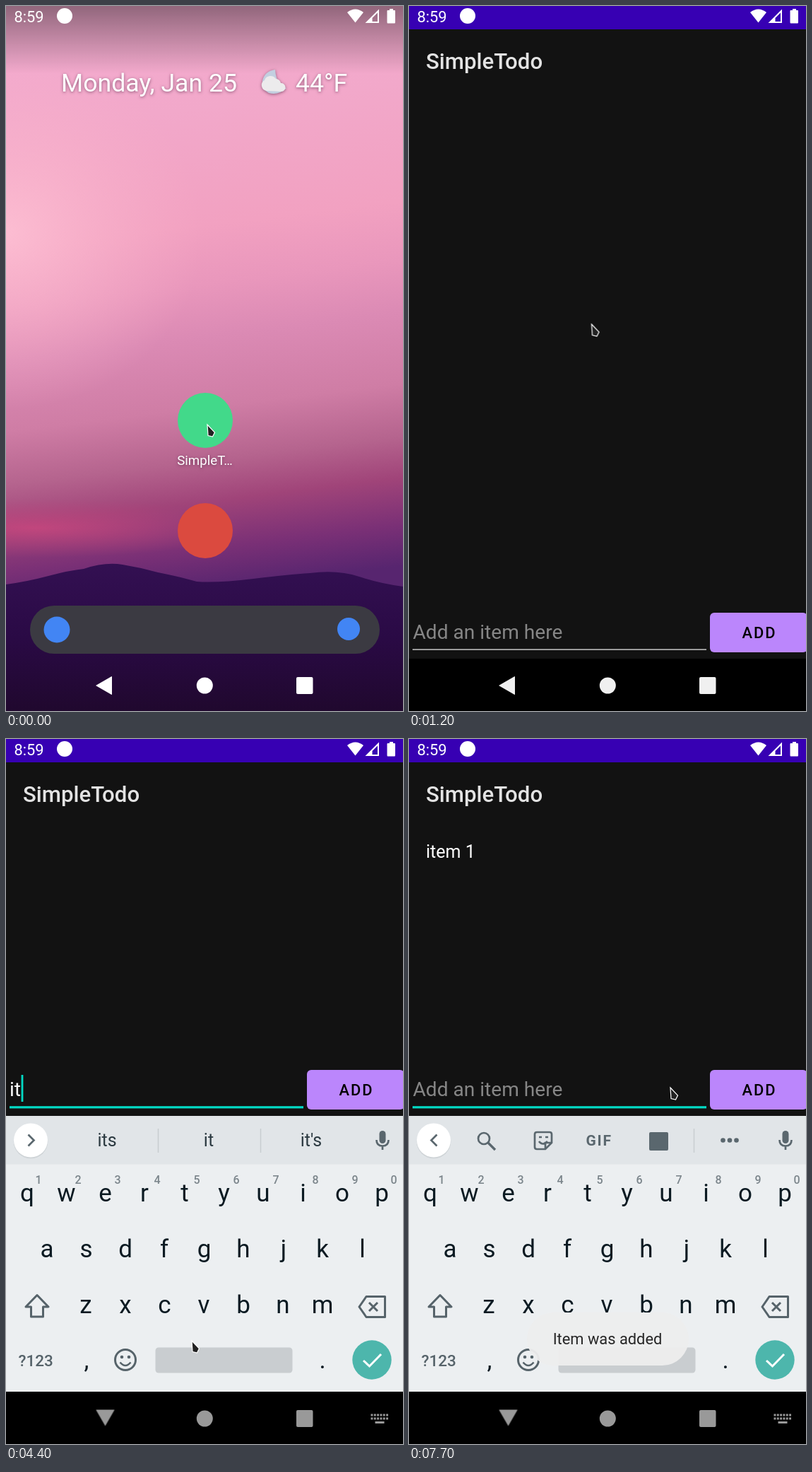
An HTML page for the animation above (8 s loop, 562 px wide and 997 px high).

```html
<!DOCTYPE html>
<html lang="en">
<head>
<meta charset="utf-8">
<title>Todo app demo</title>
<style>
html, body { margin: 0; width: 100%; height: 100%; overflow: hidden; background: #121212; }
svg { position: absolute; left: 0; top: 0; width: 562px; height: 997px; display: block; }
text { font-family: Roboto, "Noto Sans", sans-serif; white-space: pre; }
.mid { text-anchor: middle; }

/* one shared 8 s clock; --t shifts an element's start */
.a { animation: 8s step-end calc(var(--t, 0ms) - 8.02s) infinite; }

/* launcher */
.date { font-size: 35.7px; fill: #fff; }
.label { font-size: 18.7px; fill: #fff; }
.shadow { filter: drop-shadow(0 1px 2px rgba(60, 20, 50, .55)); }
.home { animation-name: home; }
.scrim { animation-name: scrim; }
@keyframes home {
  0% { transform: none; opacity: 1; }
  5% { transform: translateY(-24px); opacity: .8; }
  6.25% { transform: translateY(-57px); opacity: .42; }
  7.5%, 100% { transform: translateY(-72px); opacity: .1; }
}
@keyframes scrim { 0% { opacity: 1; } 5% { opacity: .5; } 6.25%, 100% { opacity: 0; } }

/* opening window */
.win {
  position: absolute; overflow: hidden;
  background: linear-gradient(#3700b3 29px, #121212 0);
  animation-name: win;
}
@keyframes win {
  0% { opacity: 0; left: 243px; top: 547px; width: 78px; height: 78px; border-radius: 39px; }
  5% { opacity: 1; left: 165px; top: 398px; width: 232px; height: 340px; border-radius: 52px; }
  6.25% { opacity: 1; left: 63px; top: 176px; width: 436px; height: 709px; border-radius: 45px; }
  7.5%, 100% { opacity: 1; left: 15px; top: 42px; width: 532px; height: 905px; border-radius: 18px; }
}
.app { animation-name: app; }
.content { animation-name: content; }
@keyframes app { 0% { opacity: 0; } 8.75%, 100% { opacity: 1; } }
@keyframes content { 0% { opacity: 0; } 10% { opacity: .5; } 11.25%, 100% { opacity: 1; } }

.title { font-size: 31.2px; font-weight: 500; fill: #e3e3e3; }
.item { font-size: 25px; fill: #fff; animation-name: item; }
@keyframes item { 0% { opacity: 0; } 87.5%, 100% { opacity: 1; } }

/* input row */
.row { animation-name: row; }
@keyframes row { 0% { transform: none; } 40%, 100% { transform: translateY(-390px); } }
.input { font-size: 28.1px; }
.hint { fill: #868686; animation-name: hint; }
@keyframes hint { 0% { opacity: 1; } 53.75% { opacity: 0; } 87.5%, 100% { opacity: 1; } }
.typed { fill: #fff; animation-name: typed; }
@keyframes typed { 0% { opacity: 0; } 53.75% { opacity: 1; } 87.5%, 100% { opacity: 0; } }
.on { animation-name: on; }
@keyframes on { 0% { visibility: visible; } 40%, 100% { visibility: hidden; } }
.idle { animation-name: idle; }
@keyframes idle { 0% { opacity: 1; } 25%, 100% { opacity: 0; } }
.focus { animation-name: focus; }
@keyframes focus { 0% { opacity: 0; } 25%, 100% { opacity: 1; } }
.caret { animation-name: caret; }
@keyframes caret {
  0% { opacity: 0; transform: none; }
  25% { opacity: 1; transform: none; }
  47.5% { opacity: 0; transform: none; }
  53.75% { opacity: 1; transform: translateX(7px); }
  55% { opacity: 1; transform: translateX(16px); }
  57.5% { opacity: 1; transform: translateX(31px); }
  58.75% { opacity: 1; transform: translateX(55px); }
  62.5% { opacity: 1; transform: translateX(62px); }
  63.75% { opacity: 1; transform: translateX(78px); }
  70% { opacity: 0; transform: translateX(78px); }
  76.25% { opacity: 1; transform: translateX(78px); }
  82.5% { opacity: 0; transform: translateX(78px); }
  87.5% { opacity: 1; transform: none; }
  93.75%, 100% { opacity: 0; transform: none; }
}
.add { font-size: 21.85px; font-weight: 500; letter-spacing: 1.95px; }
.press { animation-name: press; }
@keyframes press {
  0% { opacity: 0; }
  86.25% { opacity: .25; animation-timing-function: steps(5, end); }
  92.5%, 100% { opacity: 0; }
}

/* keyboard */
.kb { animation-name: kb; }
@keyframes kb { 0% { opacity: 0; } 40%, 100% { opacity: 1; } }
.key { font-size: 35px; fill: #0b1a22; text-anchor: middle; }
.num { font-size: 16px; font-weight: 500; fill: #7b858b; text-anchor: middle; }
.sym { font-size: 22.5px; font-weight: 500; fill: #56636a; }
.gif { font-size: 21px; font-weight: 700; letter-spacing: 1.8px; fill: #5a676e; stroke: none; }
.word { font-size: 25px; fill: #2c3a41; text-anchor: middle; }
.sug { animation-name: sug; }
@keyframes sug { 0% { opacity: 0; } 53.75% { opacity: 1; } 63.75%, 100% { opacity: 0; } }
.toast { animation-name: toast; }
.toast text { font-size: 21.85px; fill: #1c1c1c; }
@keyframes toast {
  0% { opacity: 0; }
  88.75% { opacity: .15; animation-timing-function: steps(6, end); }
  96.25%, 100% { opacity: .95; }
}

/* system bars */
.time { font-size: 21.85px; }
.nav { animation-name: nav; }
@keyframes nav {
  0% { fill: #fff; }
  8.75% { fill: #f0f0f0; }
  25% { fill: #f0f0f0; animation-timing-function: steps(4, end); }
  30%, 100% { fill: #999; }
}
.back { transform-origin: 139px 959.5px; animation-name: back; }
@keyframes back {
  0% { transform: none; }
  25% { transform: none; animation-timing-function: steps(4, end); }
  30% { transform: rotate(-83deg); }
  40%, 100% { transform: rotate(-90deg); }
}
.switch { animation-name: switch; }
@keyframes switch {
  0% { opacity: 0; }
  26.25% { opacity: 0; animation-timing-function: steps(3, end); }
  30%, 100% { opacity: 1; }
}

.cursor { animation-name: cursor; }
@keyframes cursor {
  0% { transform: translate(285px, 592px); }
  7.5% { transform: translate(285px, 592px); animation-timing-function: steps(6, end); }
  15% { transform: translate(258.5px, 450px); }
  16.25% { transform: translate(258.5px, 450px); animation-timing-function: steps(7, end); }
  25% { transform: translate(268px, 868px); }
  26.25% { transform: translate(269px, 875px); animation-timing-function: steps(2, end); }
  28.75% { transform: translate(270px, 886px); }
  40% { transform: translate(263px, 851px); }
  78.75% { transform: translate(280px, 826px); animation-timing-function: steps(5, end); }
  85% { transform: translate(488px, 497px); }
  90% { transform: translate(482px, 497px); animation-timing-function: steps(5, end); }
  96.25%, 100% { transform: translate(370px, 493px); }
}
</style>
</head>
<body>
<svg viewBox="0 0 562 997">
  <defs>
    <linearGradient id="sky" gradientUnits="userSpaceOnUse" x1="231" y1="0" x2="331" y2="820">
      <stop offset="0" stop-color="#f3abcf"/>
      <stop offset=".18" stop-color="#f2a8ca"/>
      <stop offset=".38" stop-color="#f2a1c1"/>
      <stop offset=".48" stop-color="#e997bc"/>
      <stop offset=".57" stop-color="#db8ab4"/>
      <stop offset=".69" stop-color="#cf7da5"/>
      <stop offset=".78" stop-color="#b5648e"/>
      <stop offset=".85" stop-color="#a04479"/>
      <stop offset=".93" stop-color="#7a3076"/>
      <stop offset="1" stop-color="#57256f"/>
    </linearGradient>
    <radialGradient id="glow">
      <stop offset="0" stop-color="#fcbdd2"/>
      <stop offset="1" stop-color="#f8afc8" stop-opacity="0"/>
    </radialGradient>
    <radialGradient id="dusk">
      <stop offset="0" stop-color="#c8477e" stop-opacity=".85"/>
      <stop offset="1" stop-color="#b8447b" stop-opacity="0"/>
    </radialGradient>
    <linearGradient id="hill" x2="0" y2="1">
      <stop offset="0" stop-color="#331052"/>
      <stop offset=".5" stop-color="#2a0a45"/>
      <stop offset="1" stop-color="#20082e"/>
    </linearGradient>
    <linearGradient id="dark" x2="0" y2="1">
      <stop offset="0" stop-opacity=".4"/>
      <stop offset="1" stop-opacity="0"/>
    </linearGradient>
  </defs>
  <rect width="562" height="997" fill="url(#sky)"/>
  <ellipse cx="0" cy="320" rx="280" ry="250" fill="url(#glow)"/>
  <ellipse cx="40" cy="738" rx="300" ry="42" fill="url(#dusk)"/>
  <path d="M0 818Q30 814 60 806T110 796Q140 786 165 790T215 801Q250 808 270 814Q300 816 350 810T430 802Q470 797 500 807T562 821V997H0Z" fill="url(#hill)"/>
  <rect class="a scrim" width="562" height="95" fill="url(#dark)"/>

  <g class="a home">
    <g class="shadow">
      <text class="date" x="78" y="121">Monday, Jan 25</text>
      <text class="date" x="410" y="121">44°F</text>
      <path d="M381 90Q366 92 363 106Q362 118 372 123Q385 127 397 116Q383 114 381 90Z" fill="#c3cfe0"/>
      <path d="M369 120A8 8 0 0 1 366 105A9 9 0 0 1 382 103A7 7 0 0 1 389 109A6 6 0 0 1 390 121Z" fill="#ecebec"/>
    </g>
    <circle cx="282" cy="586" r="39" fill="#42d98a"/>
    <text class="label mid shadow" x="281.5" y="649">SimpleT…</text>
    <circle cx="282" cy="742" r="39" fill="#db4a3f"/>
    <rect x="34" y="848" width="495" height="68" rx="34" fill="#3b3a42"/>
    <circle cx="72" cy="882" r="18.5" fill="#4285f4"/>
    <circle cx="485" cy="881" r="16" fill="#4285f4"/>
  </g>
</svg>

<div class="a win"></div>

<svg viewBox="0 0 562 997">
  <g class="a app">
    <rect width="562" height="997" fill="#121212"/>
    <rect width="562" height="33" fill="#3700b3"/>
    <rect y="923" width="562" height="74"/>
    <g class="a content">
      <text class="title" x="24" y="89">SimpleTodo</text>
      <text class="a item" x="24" y="168">item 1</text>

      <g class="a row">
        <g class="input">
          <text class="a hint" x="5.5" y="895">Add an item here</text>
          <text class="a typed" x="5" y="895"><tspan class="a on" style="--t:4.3s">i</tspan><tspan class="a on" style="--t:4.4s">t</tspan><tspan class="a on" style="--t:4.6s">e</tspan><tspan class="a on" style="--t:4.7s">m</tspan><tspan class="a on" style="--t:5s"> </tspan><tspan class="a on" style="--t:5.1s">1</tspan></text>
        </g>
        <rect class="a idle" x="5" y="909.3" width="416" height="1.6" fill="#bdbdbd"/>
        <rect class="a focus" x="5" y="909.2" width="416" height="3.2" fill="#03dac5"/>
        <rect class="a caret" x="5.6" y="865" width="2.8" height="38" fill="#03dac5"/>
        <rect x="426" y="858" width="138" height="56" rx="6" fill="#bb86fc"/>
        <rect class="a press" x="426" y="858" width="138" height="56" rx="6" fill="#fff"/>
        <text class="add" x="471.5" y="894">ADD</text>
      </g>

      <g class="a kb">
        <rect y="533" width="562" height="390" fill="#eceff1"/>
        <rect y="533" width="562" height="68.5" fill="#e1e5e8"/>
        <circle cx="35" cy="569" r="24.3" fill="#cfd4d7"/>
        <circle cx="35" cy="567.5" r="24" fill="#fff"/>
        <g fill="none" stroke="#5a676e" stroke-width="2.7">
          <path d="M39.5 559.5L31.5 567.5L39.5 575.5"/>
          <circle cx="106" cy="565" r="8"/>
          <path d="M112 571L122 581" stroke-width="3.4"/>
          <path d="M181 556H199Q202 556 202 559V571L193 580H181Q178 580 178 577V559Q178 556 181 556ZM202 571H193V580M184 569Q189 576 196 569"/>
          <path d="M184 563H188M193 563H197"/>
          <path d="M403.5 551V585" stroke="#c8cdd0" stroke-width="1.5"/>
          <path d="M524.500 567Q524.500 575.500 533 575.500T541.500 567M533 575V581"/>
          <text class="gif" x="250.500" y="575">GIF</text>
        </g>
        <g fill="#5a676e">
          <rect x="340" y="556" width="27" height="26" rx="2"/>
          <circle cx="444.5" cy="567.5" r="3.3"/>
          <circle cx="454" cy="567.5" r="3.3"/>
          <circle cx="463.500" cy="567.5" r="3.3"/>
          <rect x="528.500" y="554" width="9" height="18" rx="4.500"/>
        </g>

        <g class="a sug">
          <rect x="27" y="556" width="17" height="23" fill="#fff"/>
          <path d="M31.500 559.500L39.500 567.500L31.500 575.500" fill="none" stroke="#5a676e" stroke-width="2.700"/>
          <g class="a on" style="--t:4.3s">
            <rect x="72" y="535" width="438" height="64" fill="#e1e5e8"/>
            <text class="word" y="576"><tspan x="143">I</tspan><tspan x="287">in</tspan><tspan x="432">is</tspan></text>
          </g>
          <g class="a on" style="--t:4.4s">
            <rect x="72" y="535" width="438" height="64" fill="#e1e5e8"/>
            <text class="word" y="576"><tspan x="143">its</tspan><tspan x="287">it</tspan><tspan x="432">it's</tspan></text>
          </g>
          <g class="a on" style="--t:4.6s">
            <rect x="72" y="535" width="438" height="64" fill="#e1e5e8"/>
            <text class="word" y="576"><tspan x="143">items</tspan><tspan x="287">item</tspan><tspan x="432">itemized</tspan></text>
          </g>
          <g class="a on" style="--t:4.8s">
            <rect x="72" y="535" width="438" height="64" fill="#e1e5e8"/>
            <text class="word" y="576"><tspan x="143">items</tspan><tspan x="287">item</tspan><tspan x="432">item's</tspan></text>
          </g>
          <g class="a on" style="--t:5s">
            <rect x="72" y="535" width="438" height="64" fill="#e1e5e8"/>
            <text class="word" y="576"><tspan x="143">is</tspan><tspan x="287">in</tspan><tspan x="432">and</tspan></text>
          </g>
          <path d="M215.500 551V585M360.500 551V585" stroke="#c8cdd0" stroke-width="1.5"/>
        </g>

        <text class="key" x="30 85.500 140.500 196 253 308.500 364 420.500 476 532" y="654">qwertyuiop</text>
        <text class="num" x="46 102 158 214 270 326 382 438 494 549" y="629">1234567890</text>
        <text class="key" x="58 113.500 169 224 280.500 336 393 448 504.500" y="733">asdfghjkl</text>
        <text class="key" x="113 169 224.500 280 336 392 448" y="812">zxcvbnm</text>
        <text class="key" x="114 448" y="890">,.</text>
        <text class="sym" x="17.500" y="887">?123</text>
        <g fill="none" stroke="#56636a" stroke-width="3" stroke-linejoin="round">
          <path d="M44 786.500L60 803H52.500V817H35.500V803H28Z"/>
          <path d="M510 788.500H536.500V817.500H510L500 803ZM514 797L526 809M526 797L514 809"/>
          <circle cx="169" cy="878" r="14.500"/>
          <path d="M161.500 881.500Q169 890.500 176.500 881.500" stroke-width="2.600"/>
        </g>
        <circle cx="164" cy="874" r="2.300" fill="#56636a"/>
        <circle cx="174" cy="874" r="2.300" fill="#56636a"/>
        <rect x="211.500" y="860.500" width="194" height="36" rx="4.500" fill="#c9cdd0"/>
        <circle cx="518" cy="878" r="27.700" fill="#4db6ac"/>
        <path d="M506 879L514.500 887L531 870" fill="none" stroke="#fff" stroke-width="3"/>
      </g>

      <g class="a toast">
        <rect x="167" y="811" width="229" height="75" rx="37.500" fill="#eee"/>
        <text class="mid" x="281" y="856">Item was added</text>
      </g>
    </g>
  </g>

  <g fill="#fff">
    <text class="time" x="11.500" y="22.500">8:59</text>
    <circle cx="83" cy="14" r="11"/>
    <path d="M483 9Q494.500 0 506 9L494.500 23.500Z"/>
    <path fill-rule="evenodd" d="M528 4.500V24H508.500ZM526 9.500L518.500 17V22H526Z"/>
    <path d="M543 4H548V6H550Q551 6 551 7V23Q551 24.500 550 24.500H540.500Q539.500 24.500 539.500 23V7Q539.500 6 540.500 6H543Z"/>
  </g>

  <g class="a nav">
    <path class="a back" d="M127 961L149.500 948Q150 948 150 949V973Q150 974 149.500 974Z"/>
    <circle cx="281.300" cy="961" r="11.500"/>
    <rect x="411" y="949" width="23.500" height="24" rx="2"/>
    <g class="a switch" fill="none" stroke="#999" stroke-width="3">
      <path d="M516.500 956H541M516.500 961H541" stroke-dasharray="2.900 1.420"/>
      <path d="M522.500 966.500H535.500"/>
    </g>
  </g>

  <path class="a cursor" d="M0 0L10.500 11L7.500 17L1 15.500Z" fill="#222" stroke="#fff" stroke-width="1.200"/>
</svg>
</body>
</html>
```
